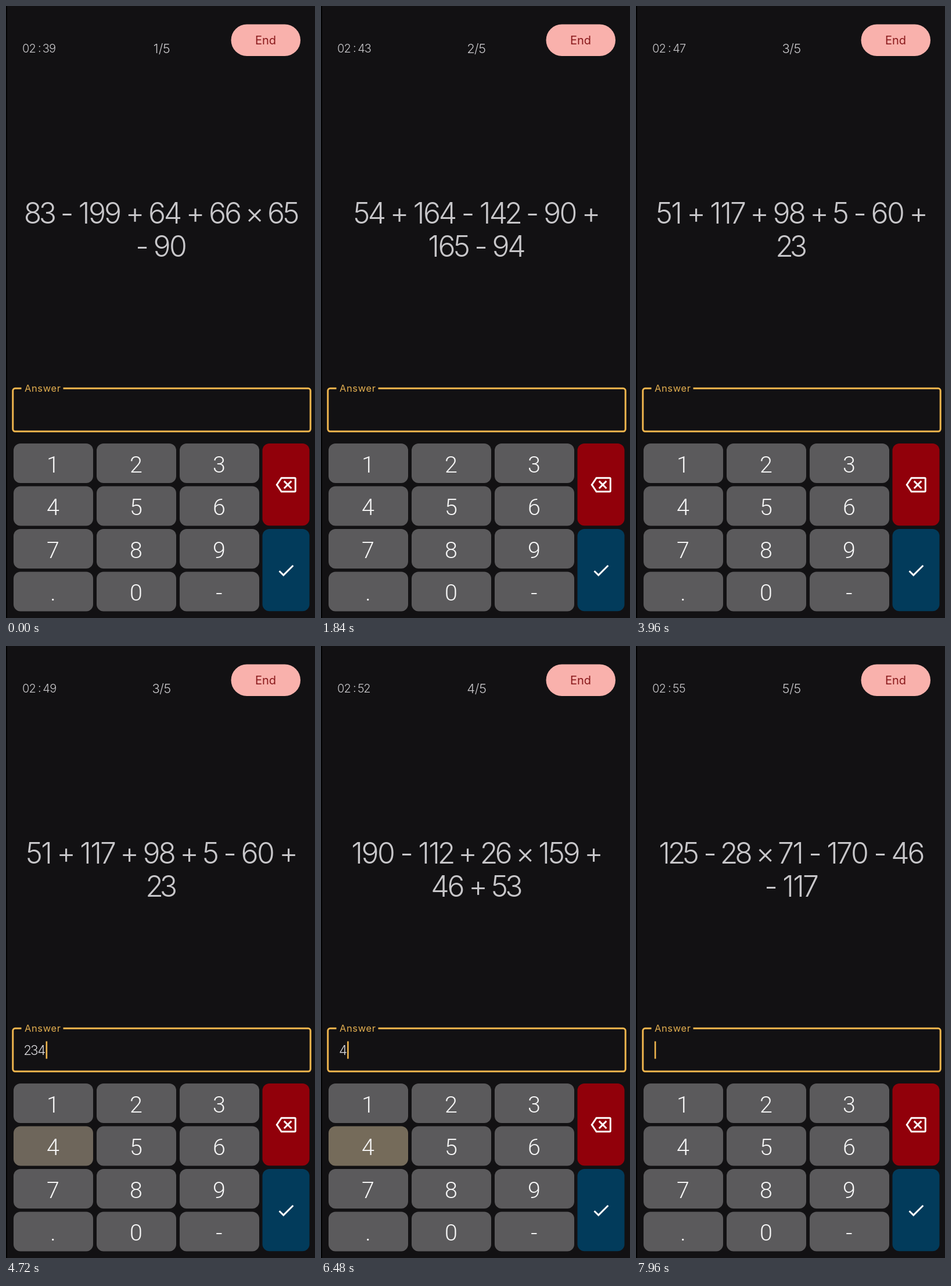
An HTML page with a canvas that plays this animation: 532x1052 px, repeating every 8000 ms.

```html
<!DOCTYPE html>
<html lang="en">
<head>
<meta charset="utf-8">
<title>Mental arithmetic</title>
<style>
  html, body { margin: 0; width: 100%; height: 100%; overflow: hidden; background: #121113; }
  canvas { display: block; }
</style>
</head>
<body>
<canvas id="stage" width="532" height="1052"></canvas>
<script>
const ctx = document.getElementById('stage').getContext('2d');
const W = 532, H = 1052, LOOP = 8000;
const BLINK = 255, SLIDE = 250, RIPPLE = 260;
const GOLD = '#f0b64e', GREY = '#c8c7ca';

const questions = [
  ['83 - 199 + 64 + 66 × 65', '- 90'],
  ['54 + 164 - 142 - 90 +', '165 - 94'],
  ['51 + 117 + 98 + 5 - 60 +', '23'],
  ['190 - 112 + 26 × 159 +', '46 + 53'],
  ['125 - 28 × 71 - 170 - 46', '- 117']
];

// Key and touch-down time in ms
const presses = [
  ['4', 150], ['1', 330], ['4', 520], ['8', 720], ['ok', 1215],
  ['5', 2190], ['7', 2430], ['ok', 2845],
  ['2', 4130], ['3', 4370], ['4', 4570], ['ok', 5536],
  ['4', 6400], ['3', 6530], ['1', 6650], ['1', 6780], ['ok', 7425]
];

const keys = [...'123456789.0-'].map((label, i) => ({
  label, x: 13 + 143 * (i % 3), y: 752 + 73.5 * Math.floor(i / 3), w: 137, h: 68, fill: '#5b5a5c'
}));
keys.push(
  { label: 'del', x: 441.5, y: 752, w: 81, h: 141.3, fill: '#91000a' },
  { label: 'ok', x: 441.5, y: 899, w: 81, h: 141.3, fill: '#023b5b' }
);

const icons = {
  del: ['M6.6 4H22a1 1 0 0 1 1 1V19a1 1 0 0 1-1 1H6.6L1.2 12Z M9.7 7.7l8.6 8.6 M18.3 7.7l-8.6 8.6', 805.3],
  ok: ['M4.1 12.7L9 17.6 20.3 6.3', 952.5]
};

// Glyph advances at 50px
const advance = { 1: 18, 2: 24, 3: 25, 4: 28, 5: 25, 6: 27, 7: 24, 8: 27, 9: 27, 0: 29,
  ' ': 11, '-': 19, '+': 27, '×': 25, '/': 20, ':': 14 };

const step = (ch, size, gap) => advance[ch] * size / 50 + gap;
const widthOf = (str, size, gap = 0) => [...str].reduce((sum, ch) => sum + step(ch, size, gap), 0);
const clamp = v => Math.min(1, Math.max(0, v));
const ease = v => (1 - Math.cos(Math.PI * clamp(v))) / 2;

function figures(str, x, y, size, gap = 0, weight = 300) {
  ctx.font = `${weight} ${size}px Inter, sans-serif`;
  ctx.textAlign = 'center';
  for (const ch of str) {
    const w = step(ch, size, gap);
    ctx.fillText(ch, x + w / 2, y);
    x += w;
  }
}

function centred(str, cx, y, size) {
  figures(str, cx - widthOf(str, size) / 2, y, size);
}

function label(str, x, y, size, color, spacing) {
  ctx.font = `400 ${size}px Inter, sans-serif`;
  ctx.textAlign = 'left';
  ctx.letterSpacing = spacing + 'px';
  ctx.fillStyle = color;
  ctx.fillText(str, x, y);
  ctx.letterSpacing = '0px';
}

function box(x, y, w, h, r) {
  ctx.beginPath();
  ctx.roundRect(x, y, w, h, r);
}

function stateAt(t) {
  const s = { page: 0, answer: '', edited: -300 };
  for (const [key, down] of presses) {
    if (key === 'ok') {
      const start = down + 35;
      s.page += ease((t - start) / SLIDE);
      if (t >= start + SLIDE) { s.answer = ''; s.edited = start + SLIDE; }
    } else if (t >= down + 40) {
      s.answer += key;
      s.edited = down + 40;
    }
  }
  return s;
}

function drawHeader(t, page) {
  const sec = 39 + Math.floor((t + 480) / 520);
  ctx.fillStyle = GREY;
  figures('02', 28, 80, 20, 0.8);
  figures(':', 55, 79, 20);
  figures(String(sec), 63.5, 80, 20, 0.8);
  centred(`${Math.round(page) + 1}/5`, 268, 80.5, 22);

  ctx.fillStyle = '#f9b1ac';
  box(387.5, 31.5, 119.5, 54.5, 27.2);
  ctx.fill();
  label('End', 429, 66, 20, '#8a1a1c', 0);
}

function drawQuestions(page) {
  ctx.fillStyle = GREY;
  questions.forEach((lines, i) => {
    const cx = 268 + (i - page) * W;
    if (Math.abs(cx - 268) < W) lines.forEach((line, n) => centred(line, cx, 373.5 + 57 * n, 50));
  });
}

function drawField(t, s) {
  ctx.strokeStyle = GOLD;
  ctx.lineWidth = 3;
  box(11.8, 657.3, 512.4, 74, 4);
  ctx.stroke();
  ctx.fillStyle = '#121113';
  ctx.fillRect(26.5, 650, 72, 12);
  label('Answer', 32, 662.5, 16.5, '#e3af50', 0.6);

  ctx.fillStyle = '#d6d5d8';
  figures(s.answer, 31.5, 702.5, 22.5, 0.6);
  if ((t - s.edited) % (2 * BLINK) < BLINK) {
    ctx.fillStyle = GOLD;
    ctx.fillRect(31.8 + widthOf(s.answer, 22.5, 0.7), 679.5, 2.6, 30);
  }
}

function drawRipple(key, age) {
  const p = age / RIPPLE;
  if (p < 0 || p > 1) return;
  ctx.save();
  ctx.clip();
  ctx.globalAlpha = 0.165 * Math.min(1, p / 0.13, (1 - p) / 0.6);
  ctx.fillStyle = '#f9c04e';
  ctx.beginPath();
  ctx.arc(key.x + key.w / 2, key.y + key.h / 2, 255 * p, 0, 2 * Math.PI);
  ctx.fill();
  ctx.restore();
}

function drawKey(key, t) {
  for (const [name, down] of [[null, 0], ...presses]) {
    if (name !== null && name !== key.label) continue;
    box(key.x, key.y, key.w, key.h, 12);
    if (name === null) {
      ctx.fillStyle = key.fill;
      ctx.fill();
    } else {
      drawRipple(key, t - down);
    }
  }
  const icon = icons[key.label];
  if (icon) {
    ctx.save();
    ctx.translate(464.5, icon[1]);
    ctx.scale(1.47, 1.47);
    ctx.strokeStyle = '#fff';
    ctx.lineWidth = 2;
    ctx.stroke(new Path2D(icon[0]));
    ctx.restore();
  } else {
    ctx.font = '300 39.5px Roboto, sans-serif';
    ctx.textAlign = 'center';
    ctx.fillStyle = '#f6f6f6';
    ctx.fillText(key.label, key.x + 68, key.y + 49.7);
  }
}

function draw() {
  const t = performance.now() % LOOP;
  const s = stateAt(t);
  ctx.fillStyle = '#121113';
  ctx.fillRect(0, 0, W, H);
  drawHeader(t, s.page);
  drawQuestions(s.page);
  drawField(t, s);
  keys.forEach(key => drawKey(key, t));
  ctx.fillStyle = '#000';
  ctx.fillRect(0, 0, 2, H);
  requestAnimationFrame(draw);
}
draw();
</script>
</body>
</html>
```
